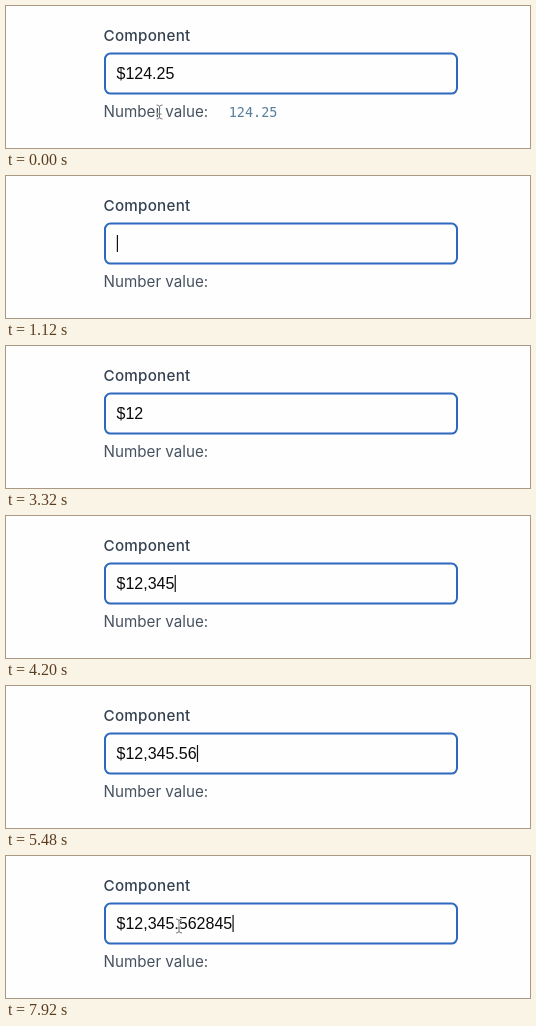
An HTML page for the animation above (8000 ms loop, 524 px wide and 142 px high).

```html
<!DOCTYPE html>
<html lang="en">
<head>
<meta charset="utf-8">
<title>Currency input</title>
<style>
  html, body { margin: 0; width: 100%; height: 100%; overflow: hidden; background: #fefefe; }
  svg { display: block; width: 524px; height: 142px; }
  .label { font: 15.2px Inter, sans-serif; fill: #46515f; }
  .title { font-weight: 500; letter-spacing: .25px; fill: #344150; }
  #number { font: 13.5px "DejaVu Sans Mono", monospace; fill: #587d9b; }
  #value { font: 16px "Liberation Sans", Arial, sans-serif; fill: #0a0a0a; }
  #caret { fill: #111; }
  #field { fill: #fefefe; }
  #mouse path { fill: none; }
</style>
</head>
<body>
<svg viewBox="0 0 524 142">
  <text class="label title" x="97.5" y="35">Component</text>
  <rect id="field"/>
  <text id="value" x="110.5" y="73"></text>
  <rect id="caret" y="59" width="1.2" height="17"/>
  <text class="label" x="97.5" y="111">Number value:</text>
  <text id="number" x="222.7" y="111">124.25</text>
  <g id="mouse">
    <path d="M-3-7q3 0 3 2q0-2 3-2M0-5V5M-3 7q3 0 3-2q0 2 3 2M-2 2H2" stroke="#fff" stroke-width="2.5"/>
    <path d="M-3-7q3 0 3 2q0-2 3-2M0-5V5M-3 7q3 0 3-2q0 2 3 2M-2 2H2" stroke="#777"/>
  </g>
</svg>
<script>
const LOOP = 8000, RESET = 440, FOCUS = 940, BLINK = 500;
const FINAL = "$12,345.562845";

// Time of each edit and the length of the text after it
const edits = [
  [FOCUS, 0], [2450, 2], [2700, 3], [3500, 5], [3720, 6], [3950, 7],
  [4520, 8], [4760, 9], [5030, 10], [5750, 11], [6080, 12], [6360, 13], [6660, 14]
];

const el = id => document.getElementById(id);
const [field, value, caret, number, mouse] =
  ["field", "value", "caret", "number", "mouse"].map(el);

const show = (node, on) => node.setAttribute("visibility", on ? "visible" : "hidden");
const set = (node, attrs) => {
  for (const name in attrs) node.setAttribute(name, attrs[name]);
};
const ease = p => {
  p = Math.min(1, Math.max(0, p));
  return p * p * (3 - 2 * p);
};

function drawField(focused) {
  const line = focused ? 2 : 1.1;
  set(field, {
    x: 98 + line / 2, y: 46.6 + line / 2,
    width: 354 - line, height: 42 - line, rx: 6.5 - line / 2,
    stroke: focused ? "#2d69bd" : "#5c5c5c", "stroke-width": line
  });
}

function drawMouse(t) {
  const leaving = t < RESET;
  show(mouse, leaving || t >= 7720);
  const x = leaving ? 153.5 + 10 * ease((t - 80) / 320) : 173;
  const y = leaving ? 106 - 36 * ease((t - 80) / 320) : 70;
  mouse.setAttribute("transform", `translate(${x} ${y})`);
}

function draw(now) {
  const t = now % LOOP;
  const edit = edits.filter(([time]) => time <= t).pop();
  const initial = t < RESET;

  value.textContent = initial ? "$124.25" : FINAL.slice(0, edit ? edit[1] : 0);
  show(number, initial);
  drawField(initial || t >= FOCUS + 60);
  drawMouse(t);

  const caretOn = edit && Math.floor((t - edit[0]) / BLINK) % 2 === 0;
  show(caret, caretOn);
  if (caretOn) caret.setAttribute("x", 110.8 + value.getComputedTextLength());

  requestAnimationFrame(() => draw(performance.now()));
}
draw(0);
</script>
</body>
</html>
```
